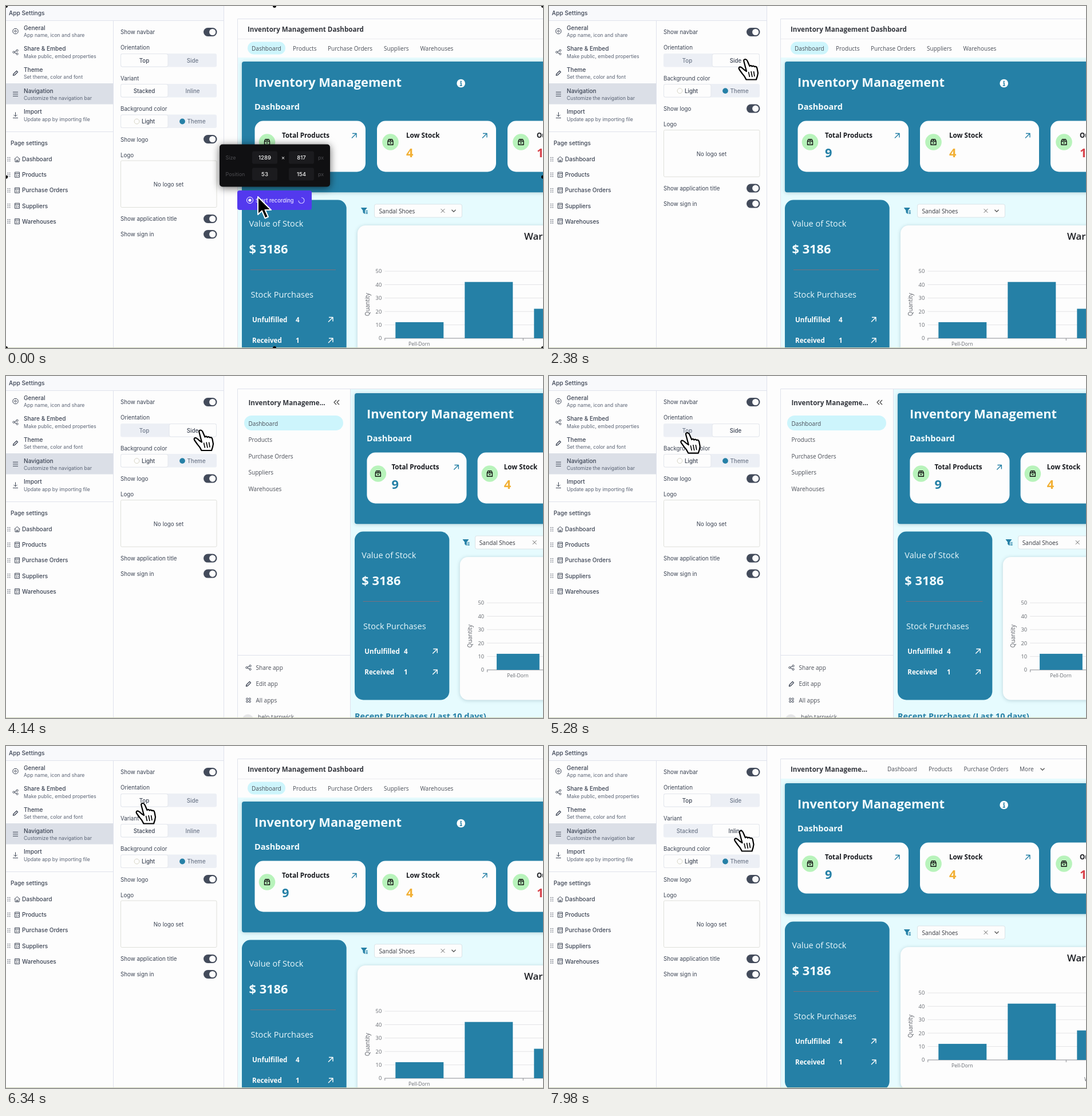
Animation, 938 px wide and 597 px high, one loop 8 s. Source, as an HTML page:

```html
<!DOCTYPE html>
<html lang="en">
<head>
<meta charset="utf-8">
<title>Navigation settings</title>
<style>
  html, body { margin: 0; width: 100%; height: 100%; overflow: hidden; background: #fdfdfd; }
  svg { display: block; width: 100vw; height: 100vh; }
  .ui { font-family: Inter, sans-serif; }
  .app { font-family: "Open Sans", "Noto Sans", sans-serif; }
  .raised { filter: drop-shadow(0 1px 3px #0b3a5038); }
</style>
</head>
<body>
<svg id="stage" viewBox="0 0 938 597" preserveAspectRatio="none"></svg>
<script>
const TEAL = '#2580a6', INK = '#3b4353', MUTED = '#6d7788', PAPER = '#fdfdfd', EDGE = '#dfe2ec';

// Markup helpers
const text = (x, y, s, size, fill = INK, weight = 400, extra = '') =>
  `<text x="${x}" y="${y}" font-size="${size}" fill="${fill}" font-weight="${weight}" ${extra}>${s}</text>`;
const centered = (x, y, s, size, fill, weight) => text(x, y, s, size, fill, weight, 'text-anchor="middle"');
const rect = (x, y, w, h, fill, r = 0, extra = '') =>
  `<rect x="${x}" y="${y}" width="${w}" height="${h}" rx="${r}" fill="${fill}" ${extra}/>`;
const circle = (x, y, r, fill, stroke = 'none') =>
  `<circle cx="${x}" cy="${y}" r="${r}" fill="${fill}" stroke="${stroke}"/>`;
const path = (d, stroke, width = 1, fill = 'none') =>
  `<path d="${d}" fill="${fill}" stroke="${stroke}" stroke-width="${width}" stroke-linejoin="round"/>`;
const at = (x, y, inner) => `<g transform="translate(${x} ${y})">${inner}</g>`;
const group = (id, inner, cls = '') => `<g id="${id}" class="${cls}">${inner}</g>`;
const border = color => `stroke="${color}"`;

const icons = {
  gear: circle(0, 0, 1.6, 'none', INK) +
    path('M-2 -4.5H2L4.5 -2V2L2 4.5H-2L-4.5 2V-2Z', INK),
  share: path('M3 -3L-3 0L3 3', INK) +
    [[3, -3], [-3, 0], [3, 3]].map(([x, y]) => circle(x, y, 1.6, PAPER, INK)).join(''),
  pencil: path('M-4 4L-3.5 1.5L2 -4L4 -2L-1.5 3.5Z', INK, 1.3),
  menu: path('M-4.5 -3.5H4.5M-4.5 0H4.5M-4.5 3.5H4.5', INK),
  download: path('M0 -5V2.5M-3 -.5L0 2.5L3 -.5M-4.5 5H4.5', INK),
  home: path('M-5 0L0 -4.5L5 0M-3.5 -1V4.5H3.5V-1M-1 4.5V1.5H1V4.5', INK),
  page: path('M-4 -4.5H4V4.5H-4ZM-4 -2H4M-2 .5H0M-2 2.5H0M2 .5V2.5', INK),
  grid: [-2.3, 2.3].flatMap(x => [-2.3, 2.3].map(y => circle(x, y, 1.6, 'none', INK))).join(''),
  drag: [-1.6, 1.6].flatMap(x => [-3, 0, 3].map(y => circle(x, y, .8, INK))).join(''),
  box: path('M-4.5 -1.5L-3 -4.8H3L4.5 -1.5V4.8H-4.5ZM-4.5 -1.5H4.5M0 -4.8V-1.5M-1.5 1.5H1.5', '#111', 1.4),
  filter: path('M-5.5 -5H4L.5 -.5V5L-2 3V-.5Z', TEAL, 1, TEAL) + path('M2 0H6M2 2.3H6M2 4.6H6', TEAL, 1.2),
  info: circle(0, 0, 7.3, '#fff') + circle(0, -3.2, 1.2, TEAL) + path('M-1.5 -.8H.3V4M-2 4H2', TEAL, 1.6),
  cross: path('M-3.3 -3.3L3.3 3.3M3.3 -3.3L-3.3 3.3', '#666'),
  chevron: path('M-3.5 -1.7L0 1.7L3.5 -1.7', '#555', 1.3)
};
const icon = (name, x, y) => at(x, y, icons[name]);
const linkArrow = (x, y, color) => at(x, y, path('M-4 4L4 -4M-3 -4H4V3', color, 1.4));

// Settings panel
const toggle = y => rect(345, y - 7.5, 23.5, 15, '#434b5b', 7.5) + circle(360.7, y, 5.6, PAPER);
const label = (y, s) => text(200, y + 3.5, s, 9.75);
const segments = (y, left, right, active) =>
  rect(200, y - 12, 168, 23.5, '#eceff5', 3) +
  rect(active ? 285 : 200.5, y - 11.5, 82.5, 22.5, PAPER, 3, border('#e3e6ec')) +
  [left, right].map((s, i) => centered(i ? 326 : 241.5, y + 3.5, s, 9.7, i == active ? INK : MUTED, 500)).join('');

const menuItems = [
  ['gear', 'General', 'App name, icon and share'],
  ['share', 'Share &amp; Embed', 'Make public, embed properties'],
  ['pencil', 'Theme', 'Set theme, color and font'],
  ['menu', 'Navigation', 'Customize the navigation bar'],
  ['download', 'Import', 'Update app by importing file']
];
const pages = ['Dashboard', 'Products', 'Purchase Orders', 'Suppliers', 'Warehouses'];

const panel =
  rect(0, 0, 380, 25, '#f8f9fc') + text(5, 15.5, 'App Settings', 10.2, INK, 500) +
  rect(0, 135, 187, 36.5, '#dbdfe7') +
  path('M0 25.5H380M380.5 0V597M187.5 25V597M0 219.5H187', EDGE) +
  menuItems.map(([name, title, hint], i) => {
    const y = 44 + i * 36.6;
    return icon(name, 16.5, y) + text(31, y - 2.3, title, 10.1, INK, 500) + text(31, y + 10.2, hint, 8.65, '#596273');
  }).join('') +
  text(8, 243, 'Page settings', 10, INK, 500) +
  pages.map((s, i) => {
    const y = 267.5 + i * 27.1;
    return icon('drag', 5, y) + icon(i ? 'page' : 'home', 19.5, y) + text(28, y + 3.7, s, 10.05, INK, 500);
  }).join('') +
  label(45, 'Show navbar') + toggle(45.5) + label(72.5, 'Orientation') +
  group('orientTop', segments(95, 'Top', 'Side', 0)) +
  group('orientSide', segments(95, 'Top', 'Side', 1)) +
  group('variant', label(126, 'Variant') +
    group('stacked', segments(148, 'Stacked', 'Inline', 0)) +
    group('inline', segments(148, 'Stacked', 'Inline', 1))) +
  group('lower',
    label(179.5, 'Background color') + segments(201.5, '', '', 0) +
    circle(228.5, 201.5, 4.4, PAPER, '#d6d3c4') + text(237, 205, 'Light', 9.7, INK, 500) +
    circle(308, 201.5, 4.9, TEAL) + text(316.5, 205, 'Theme', 9.7, MUTED, 500) +
    label(233, 'Show logo') + toggle(232.5) + label(260, 'Logo') +
    rect(200.5, 270, 167.5, 81.5, PAPER, 2, border('#dfe0da')) + centered(284, 315, 'No logo set', 9.7, INK) +
    label(371.5, 'Show application title') + toggle(371.5) +
    label(398.5, 'Show sign in') + toggle(398.5));

// Dashboard page: left edge, horizontal scale and vertical shift depend on the navbar
function dashboard(left, k, dy) {
  const X = x => left + (x - 412) * k;      // outer edges
  const T = x => X(x) + (1 - k) * 11;       // content behind a fixed padding
  const block = (x1, x2, y, h, r, extra) => rect(X(x1), y, (x2 - x1) * k, h, TEAL, r, extra);
  const sheet = (x1, x2, y, h, r, extra) => rect(T(x1), y, X(x2) - T(x1), h, PAPER, r, extra);
  const card = (x1, x2, title, value, color, dot, titleX) =>
    sheet(x1, x2, 200.5, 89, 15) + circle(T(dot), 237.5, 14.3, '#b8f3bb') + icon('box', T(dot), 237.5) +
    text(T(titleX), 230.3, title, 11.64, '#16181d', 700) + text(T(titleX), 264.3, value, 21.8, color, 700) +
    linkArrow(X(x2 - 20), 226.5, TEAL);
  const row = (y, name, value) =>
    text(T(430), y, name, 11.64, PAPER, 700) + text(T(506), y, value, 11.64, PAPER, 700) + linkArrow(X(567), y - 4, PAPER);
  const axis = T(614) + 47.3, kb = k < 1 ? .89 : 1;
  const valueY = v => 580 - v * 2.34;
  const chart =
    sheet(614, 1180, 383, 249.5, 14, 'class="raised"') +
    text(X(905), 408, 'Warehouses', 16.8, '#1d1f24', 600) +
    [0, 10, 20, 30, 40, 50].map(v =>
      path(`M${axis} ${valueY(v)}H938`, v ? '#e4e4e6' : '#8a8c92') +
      text(axis - 5, valueY(v) + 3.3, v, 9.4, '#666a70', 400, 'text-anchor="end"')).join('') +
    [[19, 12], [140, 42], [261, 22]].map(([x, v]) =>
      rect(axis + x * kb, valueY(v), 84 * kb, v * 2.34, TEAL)).join('') +
    path(`M${axis + .5} 580V584M${axis + 242 * kb} 580V584`, '#8a8c92') +
    centered(axis + 60.5 * kb, 593, 'Pell-Dorn', 8.6, '#666a70') +
    text(X(935), 617, 'Warehouse', 9.4, '#666a70') +
    `<g transform="translate(${axis - 26} 521) rotate(-90)">${centered(0, 0, 'Quantity', 10, '#5a5e66')}</g>`;
  return at(0, dy,
    block(412, 1180, 97, 228.3, 4, 'class="raised"') +
    text(T(434), 140.8, 'Inventory Management', 21.85, '#f4fcfe', 700) + icon('info', X(794.7), 135) +
    text(T(434), 180.5, 'Dashboard', 14.55, '#f4fcfe', 700) +
    card(434.5, 628, 'Total Products', 9, TEAL, 456, 482) +
    card(648, 856, 'Low Stock', 4, '#f2b035', 671.5, 699) +
    card(876, 1084, 'Out of Stock', 1, '#d8434b', 899.5, 927) +
    block(412, 594.7, 338.5, 294, 15) +
    text(T(424.5), 384.5, 'Value of Stock', 14.55, '#e9f7fb') +
    text(T(424.5), 431.5, '$ 3186', 21.85, '#f4fcfe', 700) +
    path(`M${T(427)} 460.5H${X(576)}`, '#77717f') +
    text(T(427.5), 508.5, 'Stock Purchases', 14.55, '#e9f7fb') +
    row(551.5, 'Unfulfilled', 4) + row(588, 'Received', 1) +
    icon('filter', T(626), 357.5) + sheet(643.5, 796.5, 346, 23, 3, border('#d9e4e8')) +
    text(T(651.5), 361.5, 'Sandal Shoes', 10.15, '#33363d') +
    icon('cross', X(763) - (1 - k) * 36, 357.5) + icon('chevron', X(782), 357.5) + chart +
    text(X(412), 665.5, 'Recent Purchases (Last 10 days)', 14.55, TEAL, 700));
}

const backdrop = (x, y) => rect(x, y, 938 - x, 597 - y, '#e6fbfe');
const navText = (x, y, s) => text(x, y, s, 10.05, '#4a4e57');
const appTitle = (x, y, s) => text(x, y, s, 11.64, '#33363d', 700);
const frameEdge = path('M404.5 597V22.5H938', EDGE);

const stackedApp = backdrop(404, 90) + path('M404 57.5H938', '#ebecf0') +
  appTitle(422, 44.7, 'Inventory Management Dashboard') + rect(422, 62.5, 66, 22, '#cdf5fc', 11) +
  pages.map((s, i) => navText([429, 501, 562, 660, 723.5][i], 77.5, s)).join('') + dashboard(412, 1, 0);

const inlineApp = backdrop(404, 57) + appTitle(422, 44.7, 'Inventory Manageme...') +
  [...pages.slice(0, 3), 'More'].map((s, i) => navText([591, 663, 724.5, 822][i], 44, s)).join('') +
  icon('chevron', 862, 40.5) + dashboard(412, 1, -32);

const sideApp = backdrop(601, 23) + path('M601.5 23V597M404 487.5H601', EDGE) +
  appTitle(423.5, 50.5, 'Inventory Manageme...') + path('M577 42L573 46L577 50M582 42L578 46L582 50', '#444', 1.2) +
  rect(416, 69, 173, 26, '#cdf5fc', 13) +
  pages.map((s, i) => navText(423.5, 86.5 + i * 28.5, s)).join('') +
  ['Share app', 'Edit app', 'All apps'].map((s, i) =>
    icon(['share', 'pencil', 'grid'][i], 423.5, 509 + i * 28.5) + navText(436.5, 512.7 + i * 28.5, s)).join('') +
  circle(422.5, 600, 9.5, '#e6e6e8') + navText(440, 598.5, 'help tarnwick') + dashboard(609, .905, -67);

// Recorder overlay
const field = (x, y, s) => rect(x - 22, y - 11, 44, 22, '#1b1b1e', 3) + centered(x, y + 3.4, s, 9.6, '#f2f2f2', 500);
const dim = (x, y, s) => text(x, y + 3.2, s, 9, '#4c4c50');
const recorder =
  rect(373, 241.5, 193, 74, '#101012', 5, 'style="filter:drop-shadow(0 2px 7px #0009)"') +
  [['Size', 264.5, 1289, 817], ['Position', 293.5, 53, 154]].map(([s, y, a, b]) =>
    dim(383.5, y, s) + field(452, y, a) + field(516, y, b) + dim(545, y, 'px')).join('') +
  centered(484, 268, '×', 10, '#eee') +
  rect(404, 322, 130, 34, '#5339ee', 4) + circle(426, 339, 5.5, 'none', '#fff') + circle(426, 339, 2.6, '#fff') +
  text(436, 343, 'Start recording', 9.3, '#e7e3ff', 500) +
  path('M516 334.5A5 5 0 1 1 511 339.5', '#c9c0ff', 1.2) +
  [0, 469, 938].flatMap(x => [0, 298.5, 597].filter(y => x != 469 || y != 298.5).map(y => circle(x, y, 3, '#000'))).join('');

const arrowShape = path('M0 0V31L7 24.5L12.5 37.5L18 35L12.5 23H23Z', '#fff', 2, '#000');
const handShape = at(1.5, -1, path(
  'M-3 4Q-4 0 -1 0Q2 0 3.5 4L7 12Q9 9.5 11 12.5Q13.5 10.5 15.5 13Q19 11.5 20 16L21.5 24Q21 29 18.5 35.5H1' +
  'Q-2 29 -6 25L-11 18Q-13 15 -10.5 13.5Q-8 13 -3 18L1.5 21Z', '#000', 2.2, '#fff') +
  path('M5 22L7 31M9.5 21L11.5 31M14 21L15.5 30', '#000', 1.6));

document.getElementById('stage').innerHTML =
  rect(0, 0, 938, 597, PAPER) + group('settings', panel, 'ui') +
  group('appStacked', stackedApp, 'app') + group('appSide', sideApp, 'app') + group('appInline', inlineApp, 'app') +
  frameEdge + path('M0 596.5H938', '#cfd3b8') + group('recorder', recorder, 'ui') +
  group('pointer', `<g transform="translate(336 96) scale(.28)">${arrowShape}</g>`) +
  group('cursor', group('arrow', arrowShape) + group('hand', handShape));

// Timeline
const LOOP = 8000;
const stops = [
  [0, 440, 333], [500, 440, 333], [1740, 332, 96], [2200, 342, 94], [2700, 342, 94], [3300, 339, 95.5],
  [4500, 339, 95.5], [5200, 241, 100], [5700, 238, 101], [6500, 238, 101], [7250, 334.5, 149], [LOOP, 334.5, 149]
];
const el = id => document.getElementById(id);
const show = (id, on) => el(id).setAttribute('display', on ? 'inline' : 'none');
const within = (t, from, to) => t >= from && t < to;

function cursorAt(t) {
  const i = stops.findIndex(s => s[0] > t);
  const [t0, x0, y0] = stops[i - 1], [t1, x1, y1] = stops[i];
  const p = (t - t0) / (t1 - t0), e = p * p * (3 - 2 * p);
  return [x0 + (x1 - x0) * e, y0 + (y1 - y0) * e];
}

function draw() {
  const t = performance.now() % LOOP;
  const sidePanel = within(t, 2000, 5500), inlinePanel = t >= 7350;
  const sideView = within(t, 2750, 6000), inlineView = t >= 7750;
  show('orientTop', !sidePanel);
  show('orientSide', sidePanel);
  show('variant', !sidePanel);
  show('stacked', !inlinePanel);
  show('inline', inlinePanel);
  el('lower').setAttribute('transform', `translate(0 ${sidePanel ? -53.4 : 0})`);
  show('appStacked', !sideView && !inlineView);
  show('appSide', sideView);
  show('appInline', inlineView);
  show('recorder', t < 100);
  show('pointer', within(t, 1250, 1500));
  const pointing = t >= 1650 && !within(t, 6800, 7000);
  show('hand', pointing);
  show('arrow', !pointing);
  el('cursor').setAttribute('transform', `translate(${cursorAt(t)})`);
  requestAnimationFrame(draw);
}
draw();
</script>
</body>
</html>
```
